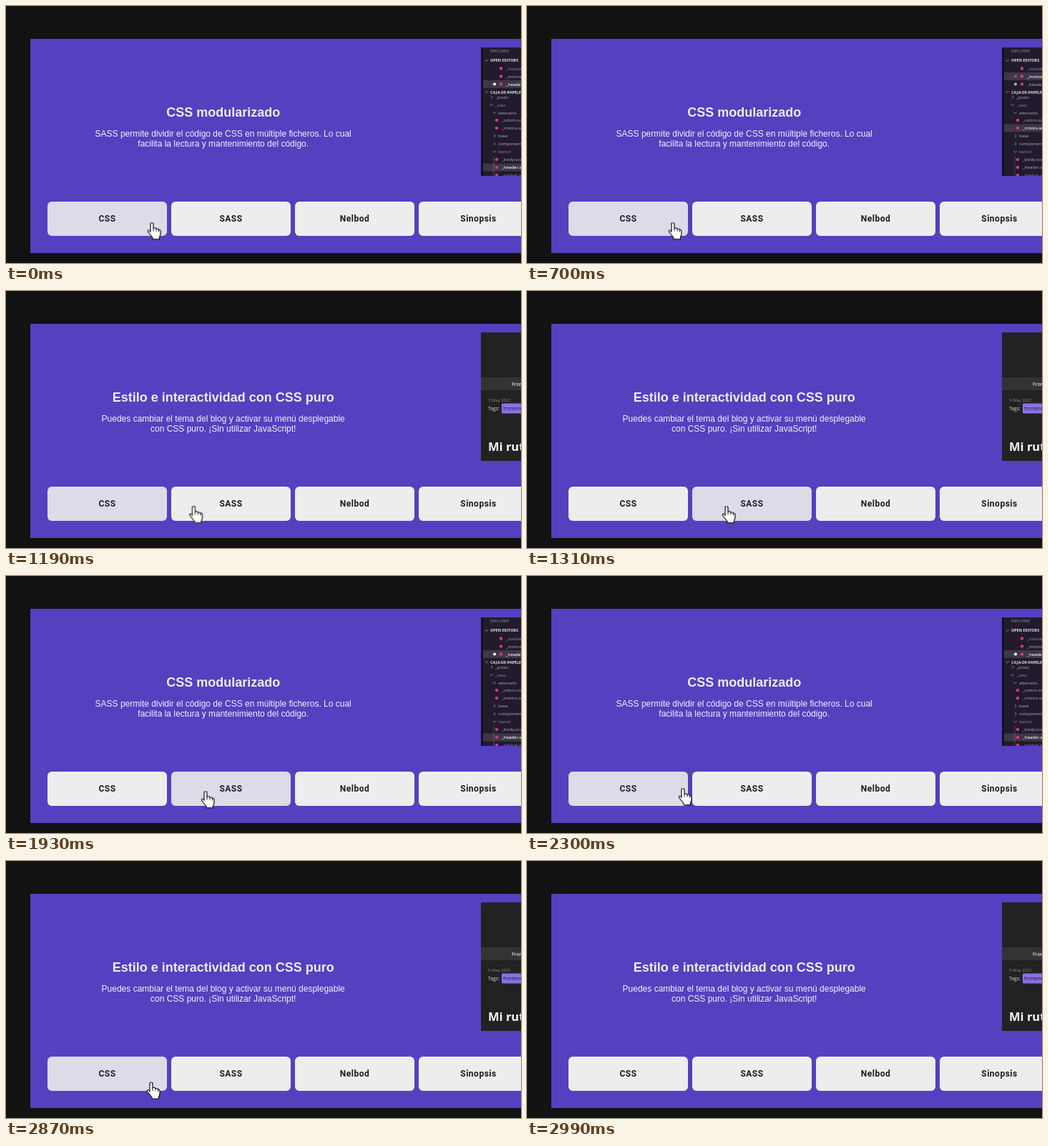
Animation, 720 px wide and 360 px high, one loop 4070 ms. Source, as an HTML page:

```html
<!DOCTYPE html>
<html lang="es">
<head>
<meta charset="utf-8">
<title>Carrusel</title>
<style>
  html, body { margin: 0; width: 100%; height: 100%; overflow: hidden; background: #121212; }
  svg { display: block; width: 720px; height: 360px; }
  text { white-space: pre; }
  .copy { font: 12px "Liberation Sans", Arial, sans-serif; fill: #f4f2fb; text-anchor: middle; }
  .copy .title { font-size: 18px; font-weight: 700; fill: #efedf8; }
  .button text { font: 700 12px Roboto, sans-serif; letter-spacing: .5px; fill: #1c1c1c; text-anchor: middle; }
  .shot { font: 6px "Open Sans", "Noto Sans", sans-serif; }
  .line { fill: none; stroke: #a9a5b3; stroke-width: .8; }
</style>
</head>
<body>
<svg id="stage" viewBox="0 0 720 360">
  <clipPath id="shotClip"><rect x="664" y="58" width="56" height="180"/></clipPath>
  <rect width="720" height="360" fill="#121212"/>
  <rect x="34" y="46" width="686" height="300" fill="#5540bf"/>

  <g id="modular">
    <g class="copy">
      <text class="title" x="303.7" y="155">CSS modularizado</text>
      <text x="303.7" y="183">SASS permite dividir el código de CSS en múltiple ficheros. Lo cual</text>
      <text x="303.7" y="197">facilita la lectura y mantenimiento del código.</text>
    </g>
    <g class="shot" clip-path="url(#shotClip)">
      <rect x="664" y="58" width="56" height="180" fill="#221b2d"/>
      <rect x="664" y="58" width="3" height="180" fill="#15111d"/>
      <g id="headerOpen"></g>
      <g id="mixinsOpen"></g>
      <g id="tree"></g>
    </g>
  </g>

  <g id="pureCss">
    <g class="copy">
      <text class="title" x="303.7" y="155">Estilo e interactividad con CSS puro</text>
      <text x="303.7" y="183">Puedes cambiar el tema del blog y activar su menú desplegable</text>
      <text x="303.7" y="197">con CSS puro. ¡Sin utilizar JavaScript!</text>
    </g>
    <g class="shot" clip-path="url(#shotClip)">
      <rect x="664" y="58" width="56" height="180" fill="#222"/>
      <rect x="664" y="121" width="56" height="18" fill="#333"/>
      <text x="707" y="133" font-size="6.8" font-weight="600" fill="#ddd">Frontend</text>
      <text x="674" y="154.5" fill="#8d8d8d">5 May 2021</text>
      <text x="674" y="167.3" font-size="6.8" fill="#ddd">Tags:</text>
      <rect x="693" y="157.5" width="40" height="14" rx="1.5" fill="#8a70e6"/>
      <text x="695" y="167.3" font-size="6.8" fill="#1d1930">frontend</text>
      <text x="674" y="223.5" font-size="16.5" font-weight="700" fill="#f5f5f5">Mi ruta</text>
    </g>
  </g>

  <g id="buttons"></g>
  <g id="cursor" stroke="#111" stroke-width="1.2" stroke-linejoin="round">
    <path fill="#fff" d="M-2 13V2Q-2 0 0 0Q2 0 2 2V8Q3 7 4.5 7.3Q6 7.5 6 9Q7.5 8 9 9Q9.5 9.5 9.5 10Q12 9.5 12 12V16Q12 18 10.5 20V23H1V21L-5 13.5Q-6.5 11 -4.5 10.5Q-3 10.5 -2 13Z"/>
    <path fill="none" stroke-width=".9" d="M2 8V12M6 9V12M9.5 10V13"/>
  </g>
</svg>
<script>
const LOOP = 4070;
const byId = id => document.getElementById(id);

function add(parent, tag, attrs, label) {
  const node = document.createElementNS(byId('stage').namespaceURI, tag);
  for (const key in attrs) node.setAttribute(key, attrs[key]);
  if (label) node.textContent = label;
  return parent.appendChild(node);
}

// Holds each value until the next listed time.
function track(node, property, steps) {
  const frames = steps.map(([time, value]) =>
    ({ offset: time / LOOP, [property]: value, easing: 'step-end' }));
  frames.push({ offset: 1, [property]: steps.at(-1)[1] });
  node.animate(frames, { duration: LOOP, iterations: Infinity });
}

// Explorer rows: [label, text x, centre y, marker, colour]
const GREY = '#b5b1bd', MAUVE = '#9b82ba', PALE = '#e4e1ea';
const rows = [
  ['EXPLORER', 677, 62.6, '', '#9a96a3'],
  ['OPEN EDITORS', 677, 76.3, 'down', PALE],
  ['_navbar.scss', 699, 87.5, 'file', MAUVE],
  ['_mixins.scss', 699, 98.5, 'file', GREY],
  ['_header.scss', 699, 109.5, 'file', GREY],
  ['CAJA-DE-PAPELES', 677, 120.5, 'down', PALE],
  ['_posts', 684, 127.7, 'right', GREY],
  ['_sass', 684, 138.5, 'down', MAUVE],
  ['abstracts', 688, 149.5, 'down', GREY],
  ['_colors.scss', 693, 160, 'file', GREY],
  ['_mixins.scss', 693, 171, 'file', GREY],
  ['base', 688, 182, 'right', GREY],
  ['components', 688, 193, 'right', GREY],
  ['layout', 688, 204, 'down', MAUVE],
  ['_body.scss', 693, 215, 'file', GREY],
  ['_header.scss', 693, 226, 'file', GREY],
  ['_navbar.scss', 693, 237, 'file', MAUVE]
];
const tree = byId('tree');
add(tree, 'path', { d: 'M682 210V238', class: 'line', opacity: .4 });
for (const [label, x, y, marker, fill] of rows) {
  const heading = fill === PALE;
  const caps = label === label.toUpperCase();
  add(tree, 'text', { x, y: y + 2.1, fill, 'font-size': caps ? 5.4 : 6.1, 'font-weight': heading ? 700 : 400 }, label);
  if (marker === 'file') add(tree, 'circle', { cx: x - 7, cy: y, r: 2.2, fill: '#d83a78' });
  if (marker === 'down') add(tree, 'path', { d: `M${x - 7.5} ${y - 1}l2.2 2.2 2.2-2.2`, class: 'line' });
  if (marker === 'right') add(tree, 'path', { d: `M${x - 6} ${y - 2.2}l2.2 2.2-2.2 2.2`, class: 'line' });
}

function selectRows(group, editorY, treeY, label) {
  for (const y of [editorY, treeY])
    add(group, 'rect', { x: 667, y: y - 5.5, width: 53, height: 11, fill: '#3e3748' });
  // Brighter label under the tree text of the selected rows.
  add(group, 'text', { x: 699, y: editorY + 2.1, 'font-size': 6.1, fill: '#fff' }, label);
  add(group, 'text', { x: 693, y: treeY + 2.1, 'font-size': 6.1, fill: '#fff' }, label);
}
const headerOpen = byId('headerOpen'), mixinsOpen = byId('mixinsOpen');
selectRows(headerOpen, 109.5, 226, '_header.scss');
add(headerOpen, 'circle', { cx: 683, cy: 109.5, r: 2.1, fill: '#fff' });
selectRows(mixinsOpen, 98.5, 171, '_mixins.scss');
add(mixinsOpen, 'path', { d: 'M681 96.5l4 4m0-4l-4 4', class: 'line', stroke: '#fff' });
add(mixinsOpen, 'circle', { cx: 683, cy: 109.5, r: 2.1, fill: GREY });

const buttons = ['CSS', 'SASS', 'Nelbod', 'Sinopsis'].map((label, i) => {
  const x = 58 + 173 * i;
  const button = add(byId('buttons'), 'g', { class: 'button' });
  add(button, 'rect', { x, y: 274, width: 167, height: 48, rx: 6, fill: '#ededed' });
  add(button, 'text', { x: x + 83.5, y: 302 }, label);
  return button;
});

track(byId('modular'), 'opacity', [[0, 1], [740, 0], [1930, 1], [2870, 0]]);
track(byId('pureCss'), 'opacity', [[0, 0], [740, 1], [1930, 0], [2870, 1]]);
track(headerOpen, 'opacity', [[0, 1], [700, 0], [1930, 1]]);
track(mixinsOpen, 'opacity', [[0, 0], [700, 1], [1930, 0]]);
track(buttons[0], 'opacity', [[0, .9], [1250, 1], [2300, .9], [2930, 1]]);
track(buttons[1], 'opacity', [[0, 1], [1250, .9], [2300, 1]]);

const cursorPath = [
  [0, 204, 303.5], [1100, 212, 303.5], [1150, 236, 302.5], [1190, 262.5, 301.5],
  [1250, 276, 301.5], [1310, 279, 301.5], [2240, 256, 300], [2300, 218, 297.5],
  [2360, 204, 296.5], [2870, 203, 310], [2930, 201, 340], [2990, 200, 380]
];
track(byId('cursor'), 'transform',
  cursorPath.map(([time, x, y]) => [time, `translate(${x}px, ${y}px)`]));
</script>
</body>
</html>
```
